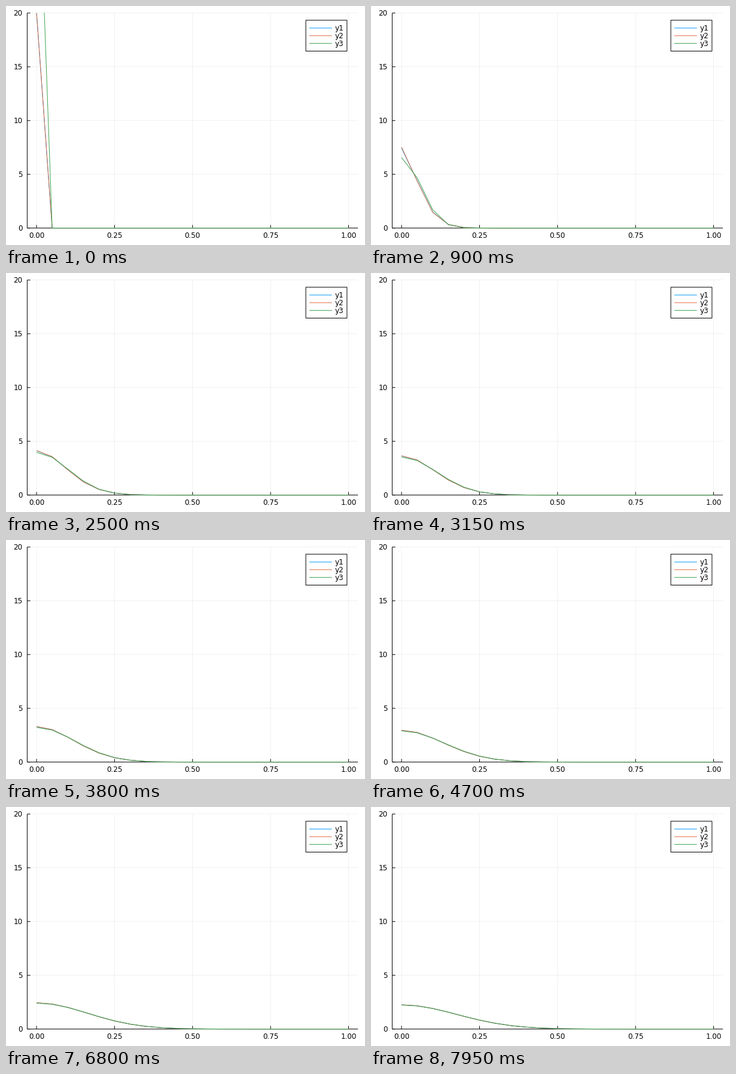
A matplotlib script for the animation above (8 s loop, 600x400 px).

```python
import numpy as np
import matplotlib.pyplot as plt
from matplotlib.animation import FuncAnimation
from matplotlib.transforms import Bbox

W, H, DPI = 600, 400, 100
PX = 72 / DPI
FRAMES, INTERVAL = 160, 50
LEFT, RIGHT, TOP, BOTTOM = 35.43, 588.19, 11.81, 371.65
COLORS = ["#009AFA", "#E36F47", "#3EA44E"]

# Heat equation on a reflecting grid: explicit, Crank-Nicolson, exact kernel
N = 21
DX = 1 / (N - 1)
STEP = 5e-5          # diffusivity times time step
SUBSTEPS = 2         # solver steps per frame
x = np.linspace(0, 1, N)

lap = np.diag(np.full(N, -2.0)) + np.eye(N, k=1) + np.eye(N, k=-1)
lap[0, 1] = lap[-1, -2] = 2
r = STEP / DX**2
eye = np.eye(N)
explicit = eye + r * lap
crank = np.linalg.solve(eye - r / 2 * lap, eye + r / 2 * lap)


def solve(matrix):
    u = np.zeros(N)
    u[0] = 1 / DX
    rows = []
    for _ in range(FRAMES):
        rows.append(u)
        for _ in range(SUBSTEPS):
            u = matrix @ u
    return rows


def kernel(frame):
    s = STEP * (SUBSTEPS * frame + 1)
    return np.exp(-x**2 / (4 * s)) / np.sqrt(4 * np.pi * s)


data = [solve(explicit), solve(crank), [kernel(k) for k in range(FRAMES)]]


def to_x(v):
    return LEFT + (v + 0.03) / 1.06 * (RIGHT - LEFT)


def to_y(v):
    return BOTTOM - v / 20 * (BOTTOM - TOP)


plt.rcParams["font.family"] = "DejaVu Sans"
fig = plt.figure(figsize=(W / DPI, H / DPI), dpi=DPI, facecolor="white")
ax = fig.add_axes([0, 0, 1, 1])
ax.set_xlim(0, W)
ax.set_ylim(H, 0)
ax.axis("off")


def line(xs, ys, color="black", width=1.0, z=2, **kw):
    return ax.plot(xs, ys, color=color, lw=width * PX, zorder=z, snap=False,
                   solid_capstyle="butt", solid_joinstyle="miter", **kw)[0]


def label(px, py, text, ha, z=2):
    ax.text(px, py + 4.4, text, ha=ha, va="baseline", fontsize=12 * PX,
            color="black", zorder=z)


for v in np.linspace(0, 1, 5):
    px = to_x(v)
    line([px, px], [TOP, BOTTOM], width=0.5, z=1, alpha=0.1)
    line([px, px], [BOTTOM, BOTTOM - 5.2])
    label(px, 383.2, f"{v:.2f}", "center")

for v in range(0, 21, 5):
    py = to_y(v)
    line([LEFT, RIGHT], [py, py], width=0.5, z=1, alpha=0.1)
    line([LEFT, LEFT + 5.2], [py, py])
    label(27.6, py, str(v), "right")

line([LEFT, RIGHT], [BOTTOM, BOTTOM])
line([LEFT, LEFT], [TOP, BOTTOM])

clip = Bbox([[35, H - 373], [589, H - 11]])
curves = []
for color in COLORS:
    curve = line([], [], color, z=3)
    curve.set_clip_box(clip)
    curves.append(curve)

ax.add_patch(plt.Rectangle((501.1, 23.8), 68.8, 51.7, facecolor="white",
                           edgecolor="black", lw=PX, zorder=4, snap=False))
for i, color in enumerate(COLORS):
    py = 36.9 + 12.85 * i
    line([507, 544.7], [py, py], color, z=5)
    label(549.8, py, f"y{i + 1}", "left", z=5)


def update(frame):
    for curve, rows in zip(curves, data):
        curve.set_data(to_x(x), to_y(rows[frame]))
    return curves


anim = FuncAnimation(fig, update, frames=FRAMES, interval=INTERVAL,
                     repeat=True, repeat_delay=0, blit=False)
plt.show()
```
